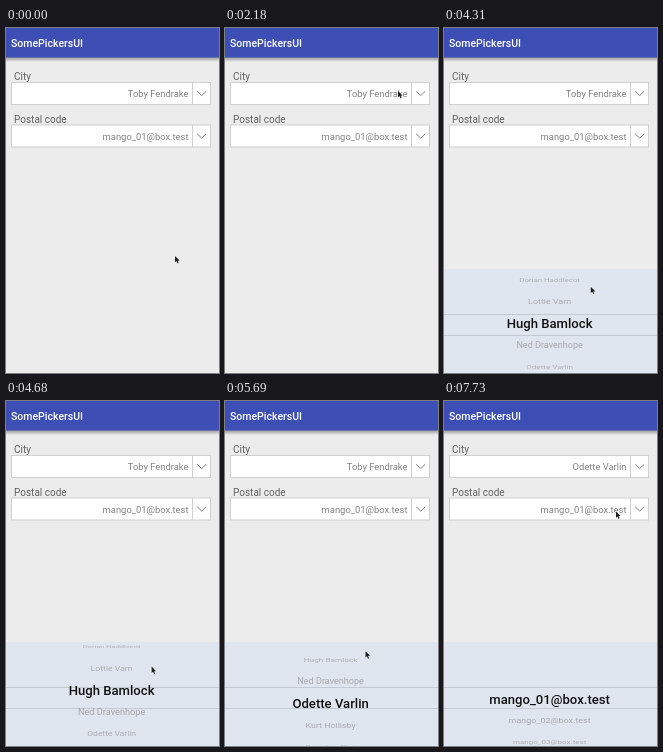
Animation, 213 px wide and 345 px high, one loop 8 s. Source, as an HTML page with a canvas:

```html
<!DOCTYPE html>
<html lang="en">
<head>
<meta charset="utf-8">
<title>SomePickersUI</title>
<style>
  html, body { margin: 0; width: 100%; height: 100%; overflow: hidden; background: #ececec; }
  canvas { display: block; width: 100%; height: 100%; }
</style>
</head>
<body>
<canvas id="stage"></canvas>
<script>
const W = 213, H = 345, LOOP = 8000;
const SHEET_TOP = 241, SHEET_H = H - SHEET_TOP;
const ROW = 21.7, MID = 297.8, CENTER_X = 105.6;
const OPEN_AT = 2700, CHOSEN_AT = 6270, MAIL_AT = 7730;
const FONT = 'Roboto, "Open Sans", sans-serif';

const people = ['Dorian Haddlecot', 'Lottie Varn', 'Hugh Bamlock', 'Ned Dravenhope',
  'Odette Varlin', 'Kurt Hollisby', 'Barnabee Flint'];
const mails = [1, 2, 3].map(n => `mango_0${n}@box.test`);

// The hand's moves; bend bows the path sideways
const start = { x: 169, y: 228 };
const moves = [
  { from: 840, to: 1420, x: 128, y: 177.5, bend: -40 },
  { from: 1420, to: 1700, x: 189, y: 97, bend: 0 },
  { from: 1750, to: 2180, x: 173, y: 63, bend: 8 },
  { from: 3190, to: 3770, x: 147, y: 294, bend: 35 },
  { from: 4180, to: 4420, x: 146.5, y: 232, bend: 0 },
  { from: 4440, to: 4960, x: 144.5, y: 307.5, bend: 0 },
  { from: 5060, to: 5850, x: 140, y: 243.5, bend: 0 },
  { from: 6420, to: 7190, x: 172, y: 110.5, bend: 14 }
];

const progress = (t, from, to) => Math.min(1, Math.max(0, (t - from) / (to - from)));
const easeOut = u => u * (2 - u);
const easeInOut = u => u * u * (3 - 2 * u);

function pointerAt(t) {
  let { x, y } = start;
  for (const m of moves) {
    const u = easeInOut(progress(t, m.from, m.to));
    x += (m.x - x) * u + m.bend * Math.sin(Math.PI * u);
    y += (m.y - y) * u;
  }
  return { x, y };
}

// A short drag, then a longer one, turn the wheel by two rows
function wheelAt(t) {
  return 2 + 0.45 * easeOut(progress(t, 4200, 4960)) + 1.55 * easeOut(progress(t, 4975, 6090));
}

const canvas = document.getElementById('stage');
const ctx = canvas.getContext('2d');

function rect(x, y, w, h, color) {
  ctx.fillStyle = color;
  ctx.fillRect(x, y, w, h);
}

function text(str, x, y, size, color, align = 'left', weight = 400) {
  ctx.font = `${weight} ${size}px ${FONT}`;
  ctx.textAlign = align;
  ctx.fillStyle = color;
  ctx.fillText(str, x, y);
}

function header() {
  const shadow = ctx.createLinearGradient(0, 29, 0, 34);
  shadow.addColorStop(0, 'rgba(0, 0, 0, 0.38)');
  shadow.addColorStop(1, 'rgba(0, 0, 0, 0)');
  rect(0, 29, W, 5, shadow);
  rect(0, 0, W, 29.5, '#3d4fb5');
  text('SomePickersUI', 5, 19, 10.5, '#fff', 'left', 500);
}

function field(label, value, y) {
  text(label, 8, y - 2, 10, '#636363');
  rect(5, y, 200, 23, '#d0d0d0');
  rect(6, y + 1, 180, 21, '#fff');
  rect(187, y + 1, 17, 21, '#fff');
  text(value, 182.5, y + 15, 9.4, '#828282', 'right');
  ctx.beginPath();
  ctx.moveTo(191.2, y + 9.3);
  ctx.lineTo(195.7, y + 13.6);
  ctx.lineTo(200.2, y + 9.3);
  ctx.strokeStyle = '#808080';
  ctx.lineWidth = 1;
  ctx.stroke();
}

function row(str, d) {
  const y = MID + d * ROW;
  if (Math.abs(d) < 0.5) {
    text(str, CENTER_X, y + 4.8, 13.1, '#111', 'center', 500);
    return;
  }
  // Rows away from the middle tilt back on the drum
  ctx.save();
  ctx.translate(CENTER_X, y);
  ctx.scale(1, Math.cos(d * 0.45));
  ctx.globalAlpha = 0.72 - 0.06 * Math.abs(d);
  text(str, 0, 3.2, 9.3 - 0.32 * d * d, '#8a8a8c', 'center');
  ctx.restore();
}

function picker(items, pos, shift) {
  ctx.save();
  ctx.translate(0, shift);
  ctx.beginPath();
  ctx.rect(0, SHEET_TOP, W, SHEET_H);
  ctx.clip();
  rect(0, SHEET_TOP, W, SHEET_H, '#e0e6ef');
  rect(0, 286, W, 1, '#c4cad2');
  rect(0, 307, W, 1, '#c4cad2');
  items.forEach((item, i) => {
    if (Math.abs(i - pos) < 2.6) row(item, i - pos);
  });
  ctx.restore();
}

function arrow({ x, y }) {
  ctx.save();
  ctx.translate(x, y);
  ctx.scale(0.88, 0.88);
  const shape = new Path2D('M0 0V7.2L1.7 5.7L2.9 8.4L4.1 7.9L2.9 5.3L5.2 5.2Z');
  ctx.strokeStyle = 'rgba(255, 255, 255, 0.8)';
  ctx.lineWidth = 1;
  ctx.lineJoin = 'round';
  ctx.stroke(shape);
  ctx.fillStyle = '#1c1c1c';
  ctx.fill(shape);
  ctx.restore();
}

function draw(t) {
  rect(0, 0, W, H, '#ececec');
  header();
  field('City', t < CHOSEN_AT ? 'Toby Fendrake' : people[4], 54);
  field('Postal code', mails[0], 96.5);
  if (t >= MAIL_AT) picker(mails, 0, 0);
  else if (t >= OPEN_AT) {
    const hidden = 1 - easeOut(progress(t, OPEN_AT, 2950));
    picker(people, wheelAt(t), SHEET_H * hidden);
  }
  arrow(pointerAt(t));
}

function frame() {
  const ratio = window.devicePixelRatio || 1;
  const w = Math.round(innerWidth * ratio), h = Math.round(innerHeight * ratio);
  if (canvas.width !== w || canvas.height !== h) {
    canvas.width = w;
    canvas.height = h;
  }
  ctx.setTransform(w / W, 0, 0, h / H, 0, 0);
  draw(performance.now() % LOOP);
  requestAnimationFrame(frame);
}
frame();
</script>
</body>
</html>
```
